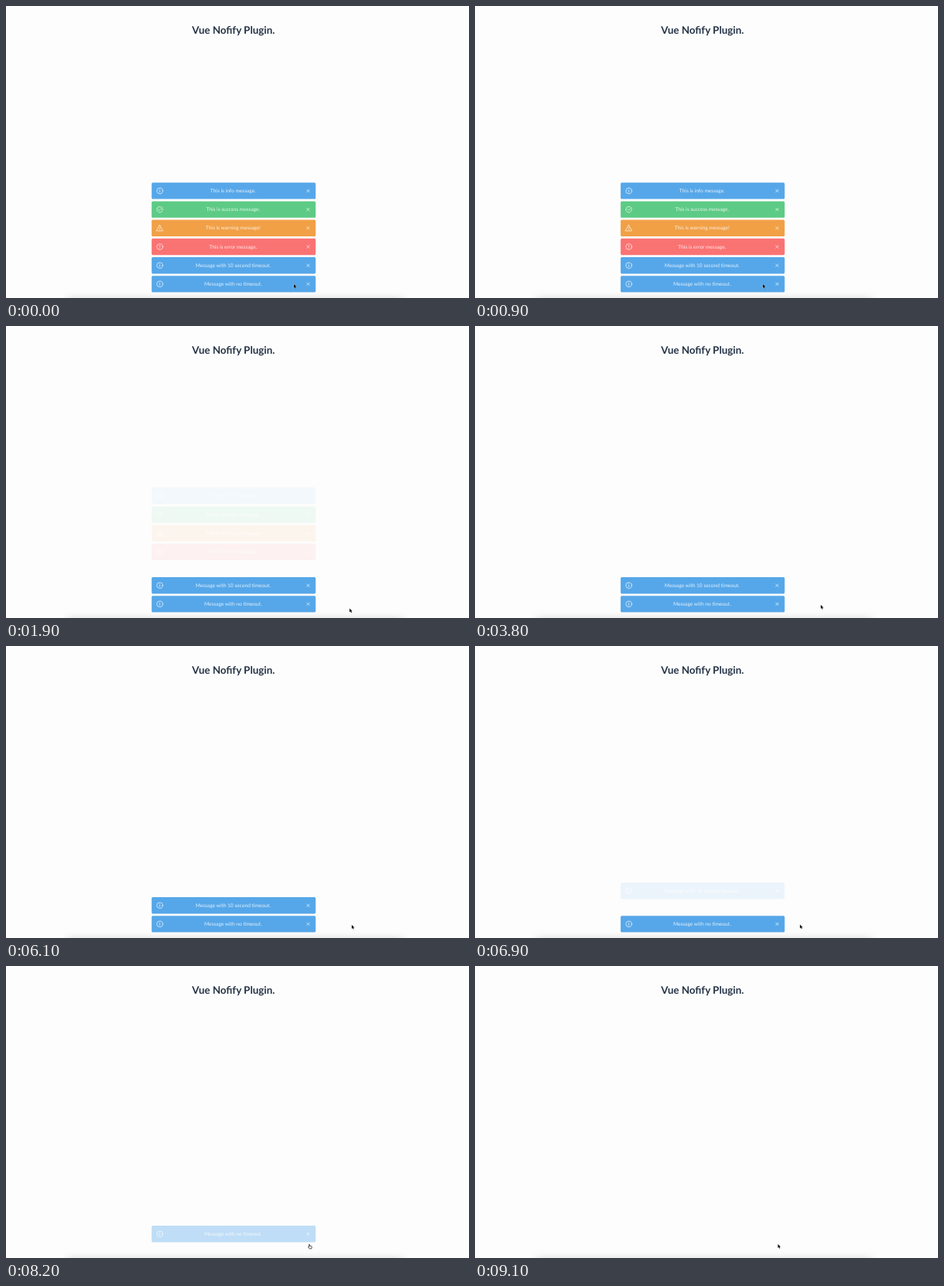
Write an HTML page that moves like this. It is 600x379 px and loops after 9500 ms.

```html
<!DOCTYPE html>
<html lang="en">
<head>
<meta charset="utf-8">
<title>Vue Nofify Plugin.</title>
<style>
  html, body { margin: 0; width: 100%; height: 100%; overflow: hidden; background: #fdfdfd; }
  svg { display: block; width: 100%; height: 100%; }
  text { font-family: Lato, "Open Sans", sans-serif; text-anchor: middle; text-rendering: geometricPrecision; }
  .title { font-size: 13.4px; font-weight: 700; fill: #253347; }
  .label { font-size: 6.6px; fill: #fff; fill-opacity: .84; }
  .icon { fill: none; stroke: #fff; stroke-width: .65; stroke-linecap: round; stroke-linejoin: round; }
  .toast {
    animation: leave 400ms ease both paused;
    animation-delay: calc((var(--start) - var(--t)) * 1ms);
  }
  @keyframes leave {
    to { opacity: 0; transform: translateY(-21px); }
  }
</style>
</head>
<body>
<svg viewBox="0 0 600 379">
  <defs>
    <filter id="blur" x="-10%" y="-150%" width="120%" height="400%">
      <feGaussianBlur stdDeviation="5.5"/>
    </filter>
    <g id="info">
      <circle r="3.8"/>
      <path d="M-.4 -.5H0V1.9M0 -2V-1.9"/>
    </g>
    <g id="success">
      <path d="M3.6 -1.2A3.8 3.8 0 1 1 2.3 -3M-1.9 -.3L-.3 1.3L3.3 -2.4"/>
    </g>
    <g id="warning">
      <path d="M0 -3.9L4.1 3.6H-4.1ZM0 -1.2V1.1M0 2.3V2.4"/>
    </g>
    <g id="error">
      <circle r="3.8"/>
      <path d="M0 -2V.5M0 1.9V2"/>
    </g>
  </defs>

  <rect x="80" y="380" width="433" height="20" fill="#000" fill-opacity=".17" filter="url(#blur)"/>
  <text class="title" x="294.8" y="36.2">Vue Nofify Plugin.</text>
  <g id="toasts"></g>

  <g id="cursor" stroke="#fff" stroke-linejoin="round">
    <path id="arrow" d="M0 0V5L1.2 3.9L2 5.8L2.9 5.4L2.1 3.6H3.7Z" fill="#111" stroke-width=".45" paint-order="stroke"/>
    <path id="hand" d="M1.2 .4Q1.7 -.2 2.1 .5V2.2L4.4 2.7Q5 3 4.9 3.8L4.3 6H1.8L.2 3.9Q0 3.2 .7 3.3L1.2 3.7Z"
      fill="#f4f4f4" stroke="#222" stroke-width=".75"/>
  </g>
</svg>

<script>
  const LOOP = 9500, STEP = 100;
  const COLORS = { info: '#56a7e9', success: '#5dcb85', warning: '#f1a046', error: '#fa7373' };

  // type, message, time it starts to leave
  const TOASTS = [
    ['info', 'This is info message.', 1620],
    ['success', 'This is success message.', 1640],
    ['warning', 'This is warning message!', 1640],
    ['error', 'This is error message.', 1640],
    ['info', 'Message with 10 second timeout.', 6650],
    ['info', 'Message with no timeout.', 8055]
  ];

  const smooth = k => k * k * (3 - 2 * k);
  const speedUp = k => k ** 4;

  const HOME = { x: 373, y: 361 };
  const MOVES = [
    { from: 1700, to: 1940, x: 451, y: 367, ease: smooth },
    { from: 1940, to: 2100, x: 451, y: 362, ease: smooth },
    { from: 2700, to: 3900, x: 448, y: 362, ease: smooth },
    { from: 6000, to: 7100, x: 388, y: 361, ease: speedUp },
    { from: 7100, to: 7500, x: 382.6, y: 356.6, ease: smooth },
    { from: 7500, to: 8000, x: 391.5, y: 361, ease: smooth },
    { from: 9000, to: 9100, x: 392.5, y: 361, ease: smooth }
  ];
  const HAND = { from: 7800, to: 9100 };

  const $ = id => document.getElementById(id);

  $('toasts').innerHTML = TOASTS.map(([type, message, start], i) => `
    <g transform="translate(189 ${229.4 + i * 24.2})">
      <g class="toast" style="--start:${start}">
        <rect x="-.3" y="-.2" width="212.6" height="21.4" rx="1.6" fill="${COLORS[type]}"/>
        <use href="#${type}" class="icon" x="10.3" y="10.5"/>
        <text class="label" x="105.3" y="12.7">${message}</text>
        <path class="icon" d="M200.8 8.8l3.4 3.4m0 -3.4l-3.4 3.4"/>
      </g>
    </g>`).join('');

  function pointerAt(t) {
    let { x, y } = HOME;
    for (const m of MOVES) {
      const k = m.ease(Math.min(1, Math.max(0, (t - m.from) / (m.to - m.from))));
      x += (m.x - x) * k;
      y += (m.y - y) * k;
    }
    return [x, y];
  }

  function draw(t) {
    document.documentElement.style.setProperty('--t', t);
    const hand = t >= HAND.from && t < HAND.to;
    $('cursor').setAttribute('transform', `translate(${pointerAt(t)})`);
    $('arrow').style.display = hand ? 'none' : '';
    $('hand').style.display = hand ? '' : 'none';
  }

  // the picture advances ten times a second
  const begin = performance.now();
  function tick() {
    const t = (performance.now() - begin) % LOOP;
    draw(Math.floor(t / STEP) * STEP);
    requestAnimationFrame(tick);
  }
  tick();
</script>
</body>
</html>
```
